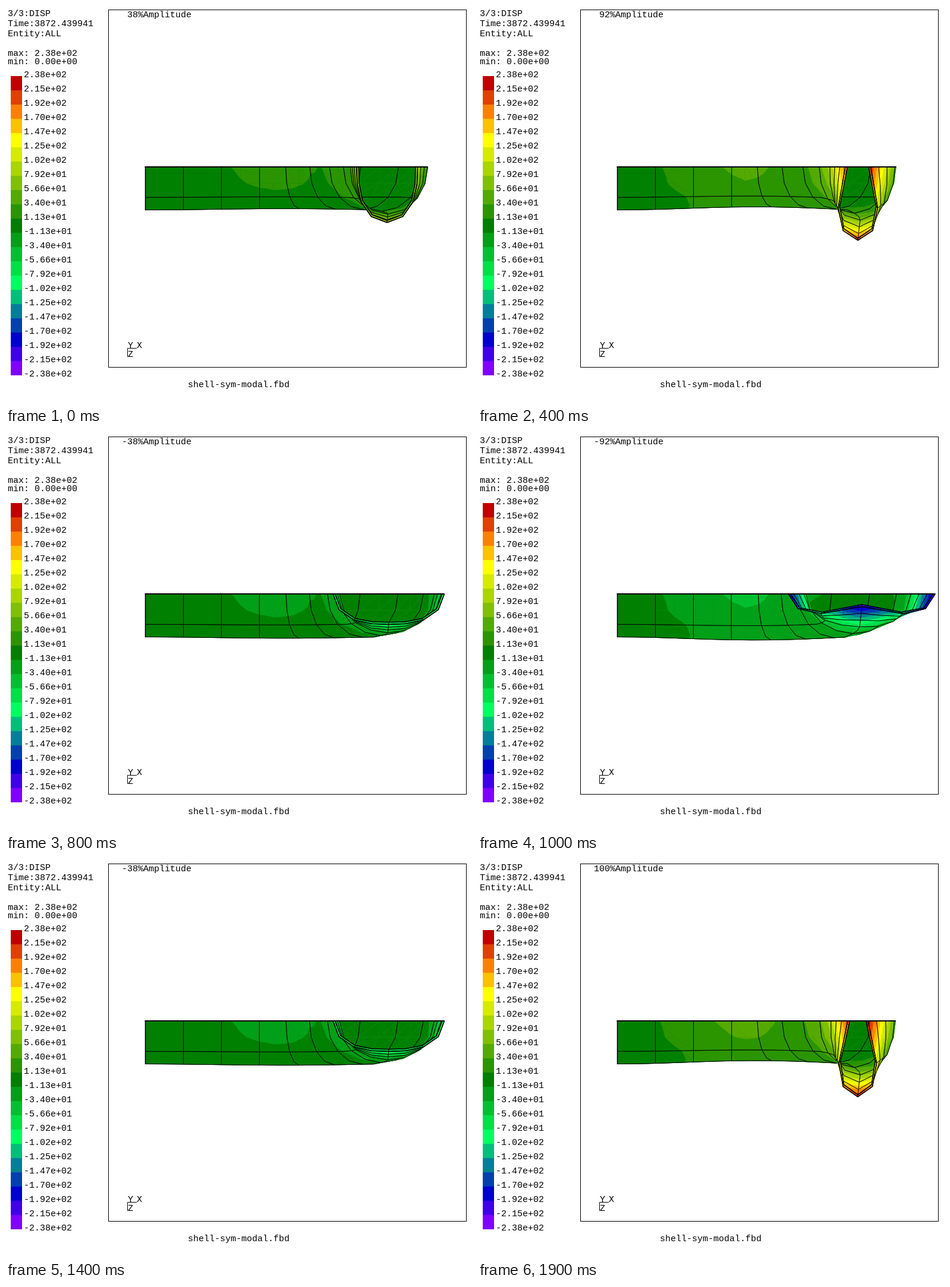
An HTML page with a canvas that plays this animation: 784 by 672 pixels, repeating every 2 s.

```html
<!DOCTYPE html>
<html lang="en">
<head>
<meta charset="utf-8">
<title>Modal shape of a pipe elbow</title>
<style>
html, body { margin: 0; width: 784px; height: 672px; overflow: hidden; background: #fff; }
canvas { display: block; }
</style>
</head>
<body>
<canvas id="stage" width="784" height="672"></canvas>
<script>
const ctx = document.getElementById('stage').getContext('2d');
const clamp = (v, low, high) => Math.max(low, Math.min(high, v));
const bell = (u, center, width) => Math.exp(-((u - center) ** 2) / width);

// Colour scale, blended between a few key colours
const MAX = 237.7, BANDS = 21, STEP = 2 * MAX / BANDS;
const KEY_COLORS = [
  { at: 0, rgb: [192, 0, 0] }, { at: 2, rgb: [255, 128, 0] }, { at: 4, rgb: [255, 255, 0] },
  { at: 10, rgb: [0, 128, 0] }, { at: 14, rgb: [0, 255, 96] }, { at: 18, rgb: [0, 0, 204] },
  { at: 20, rgb: [128, 0, 255] }
];
const COLORS = Array.from({ length: BANDS }, (_, i) => {
  const k = Math.max(1, KEY_COLORS.findIndex(key => key.at >= i));
  const a = KEY_COLORS[k - 1], b = KEY_COLORS[k], t = (i - a.at) / (b.at - a.at);
  return `rgb(${a.rgb.map((v, n) => Math.round(v + (b.rgb[n] - v) * t))})`;
});

// Half pipe: straight run along x, 90 degree elbow, straight run towards the viewer.
// Sections are counted along the pipe; the last one is the inner edge of the open end.
const AXIS_Y = 270.5, RADIUS = 72.5, BEND = 216, THICKNESS = 3.5;
const ELBOW = 3, TUBE = 8, RIM = 11, LAST = 12;
const UNITS_PER_PX = 3.9;

// i: section, w: position around the half ring in steps of 45 degrees
function makeNode(i, w) {
  const u = Math.min(i, RIM), radius = RADIUS - THICKNESS * Math.max(0, i - RIM);
  const bend = clamp(u - ELBOW, 0, 5) * Math.PI / 10, phi = w * Math.PI / 4;
  const c = Math.cos(phi), s = Math.sin(phi);
  const nx = -Math.sin(bend), nz = Math.cos(bend);

  // Ring ovalisation: a gentle squeeze along the run, growing strongly towards the rim
  const squeeze = Math.sin(Math.PI * Math.min(u / 7.2, 1)) ** 2;
  const oval = 12.3 * Math.max(0, u - 6.5) - squeeze * (5.6 + 1.8 * c) + 4 * c * bell(u, 8, 3);
  const c2 = Math.cos(2 * phi), s2 = Math.sin(2 * phi) / 2;
  const dn = -oval * (c2 * c + s2 * s);

  // Rigid shift, strongest on the inner side of the bend
  const share = 0.45 + 0.55 * c;
  const dx = dn * nx + 5 * bell(u, 6, 3) * share - 1.2 * Math.max(0, u - TUBE);
  const dz = dn * nz + (1.1 * Math.min(u, 3.3) + 6 * bell(u, 7, 1.5)) * share;
  const dy = oval * (s2 * c - c2 * s);
  return {
    x: 234 + 64 * Math.min(u, ELBOW) - BEND * nx + radius * c * nx,
    y: AXIS_Y + radius * s,
    z: 30 * Math.max(0, u - TUBE) + BEND * (1 - nz) + radius * c * nz,
    dx, dy, value: UNITS_PER_PX * Math.hypot(dx, dy, dz)
  };
}

const nodes = Array.from({ length: 2 * LAST + 1 }, (_, i) =>
  Array.from({ length: 9 }, (_, j) => makeNode(i / 2, j / 2)));

const OUTLINE = [[0, 0], [0, 1], [0, 2], [1, 2], [2, 2], [2, 1], [2, 0], [1, 0]];
const elements = [];
for (let i = 0; i < 2 * LAST; i += 2)
  for (let j = 0; j < 8; j += 2) elements.push({ i, j, depth: nodes[i + 1][j + 1].z });
elements.sort((a, b) => a.depth - b.depth);

function trace(points) {
  ctx.beginPath();
  for (const p of points) ctx.lineTo(p.x, p.y);
}

function fillPolygon(points, color) {
  trace(points);
  ctx.closePath();
  ctx.fillStyle = ctx.strokeStyle = color;
  ctx.lineWidth = 0.6;
  ctx.fill();
  ctx.stroke();
}

function strokeLine(points, width) {
  trace(points);
  ctx.strokeStyle = '#000';
  ctx.lineWidth = width;
  ctx.stroke();
}

// Part of a polygon where the field is at least the given level
function clipAbove(points, level) {
  const kept = [];
  points.forEach((a, k) => {
    const b = points[(k + 1) % points.length];
    if (a.f >= level) kept.push(a);
    if ((a.f >= level) !== (b.f >= level)) {
      const t = (level - a.f) / (b.f - a.f);
      kept.push({ x: a.x + t * (b.x - a.x), y: a.y + t * (b.y - a.y), f: level });
    }
  });
  return kept;
}

function fillContours(triangle) {
  const field = triangle.map(p => p.f);
  const low = Math.round(Math.min(...field) / STEP), high = Math.round(Math.max(...field) / STEP);
  for (let band = low; band <= high; band++) {
    const part = band === low ? triangle : clipAbove(triangle, (band - 0.5) * STEP);
    if (part.length > 2) fillPolygon(part, COLORS[clamp(10 - band, 0, BANDS - 1)]);
  }
}

function drawModel(amplitude) {
  const moved = nodes.map(row => row.map(n => ({
    x: n.x + amplitude * n.dx,
    y: n.y + amplitude * n.dy,
    f: amplitude * n.value
  })));
  ctx.save();
  ctx.translate(0.5, 0.5);
  ctx.lineJoin = 'round';
  for (const { i, j } of elements) {
    for (const [di, dj] of [[0, 0], [0, 1], [1, 0], [1, 1]]) {
      const a = moved[i + di][j + dj], b = moved[i + di + 1][j + dj];
      const c = moved[i + di + 1][j + dj + 1], d = moved[i + di][j + dj + 1];
      fillContours([a, b, c]);
      fillContours([a, c, d]);
    }
    const ring = OUTLINE.map(([di, dj]) => moved[i + di][j + dj]);
    strokeLine([...ring, ring[0]], 1);
  }
  for (const section of [0, RIM, LAST]) strokeLine(moved[2 * section], 1.5);
  const right = Math.max(...moved.map(row => row[8].x));
  strokeLine([{ x: 233, y: AXIS_Y }, { x: right, y: AXIS_Y }], 2);
  ctx.restore();
}

const scientific = n => n.toExponential(2).replace(/(\d)$/, '0$1');

function drawPanel() {
  ctx.fillStyle = '#fff';
  ctx.fillRect(0, 0, 784, 672);
  COLORS.forEach((color, i) => {
    ctx.fillStyle = color;
    ctx.fillRect(8, 118 + 24 * i, 19, 24);
  });
  ctx.fillStyle = '#000';
  ctx.font = '15px "Liberation Mono", monospace';
  ctx.textAlign = 'left';
  ['3/3:DISP', 'Time:3872.439941', 'Entity:ALL'].forEach((text, i) =>
    ctx.fillText(text, 3, 17 + 17 * i));
  ctx.fillText('max: ' + scientific(MAX), 3, 84);
  ctx.fillText('min: 0.00e+00', 3, 98);
  for (let i = 0; i <= BANDS; i++)
    ctx.fillText(scientific(MAX - STEP * i), 30, 120 + 24 * i);
  ctx.fillText('shell-sym-modal.fbd', 306, 642);
  ctx.fillText('Y', 205, 576);
  ctx.fillText('X', 220, 576);
  ctx.fillText('Z', 205, 591);
  strokeLine([{ x: 220, y: 576.5 }, { x: 204.5, y: 576.5 }, { x: 204.5, y: 591 }], 1);
  ctx.strokeRect(172.5, 6.5, 602, 602);
}

function draw(now) {
  const step = Math.floor(now / 100) % 20;
  const amplitude = Math.sin((step + 1) * Math.PI / 8);
  drawPanel();
  ctx.textAlign = 'right';
  ctx.fillText(Math.round(100 * amplitude) + '%Amplitude', 312, 19);
  drawModel(amplitude);
  requestAnimationFrame(draw);
}
requestAnimationFrame(draw);
</script>
</body>
</html>
```
